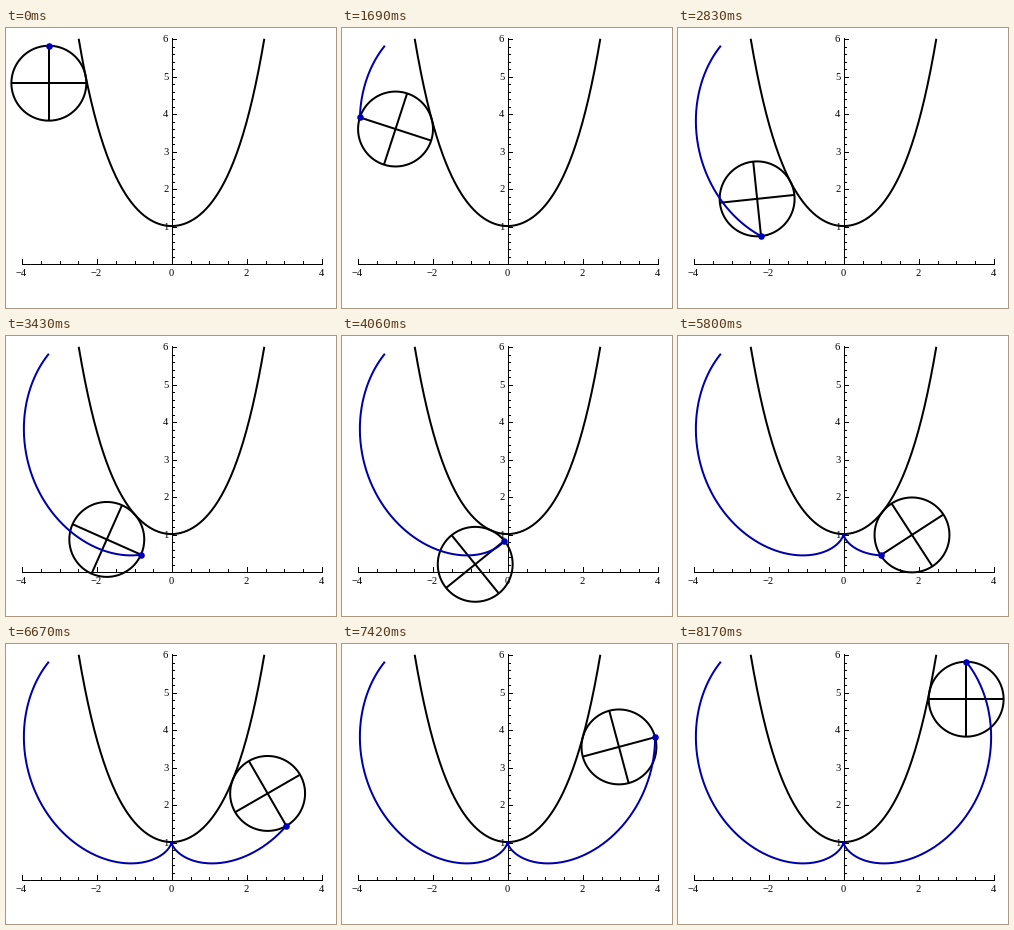
A matplotlib script for the animation above (9170 ms loop, 330 px wide and 280 px high).

```python
import numpy as np
import matplotlib.pyplot as plt
from matplotlib.animation import FuncAnimation
from matplotlib.collections import LineCollection

W, H = 330, 280
PX = 0.72                       # points per pixel at 100 dpi
X0, Y0, UNIT = 165.5, 235.5, 37.45
STEP_MS, HOLD_MS, LOOP_MS, TICK = 30, 1000, 9170, 14
STEPS, SUB = 240, 4             # poses, trace samples per pose
TRACE, DOT = (0, 0, 0.66), (0, 0, 0.73)


def to_px(x, y):
    return X0 + UNIT * np.asarray(x), Y0 - UNIT * np.asarray(y)


def turn(t):
    """Total rotation of the unit wheel touching y = cosh x at x = t."""
    return np.sinh(t) + 2 * np.arctan(np.tanh(t / 2))


# The wheel turns at a constant rate; invert turn() to find the contact.
phi = np.linspace(-2 * np.pi, 2 * np.pi, STEPS * SUB + 1)
grid = np.linspace(-2.4, 2.4, 20001)
contact = np.interp(phi, turn(grid), grid)
cx = contact + np.tanh(contact)
cy = np.cosh(contact) - 1 / np.cosh(contact)
angle = np.pi / 2 + phi
trace_x, trace_y = to_px(cx + np.cos(angle), cy + np.sin(angle))

fig = plt.figure(figsize=(W / 100, H / 100), dpi=100, facecolor="white")
ax = fig.add_axes([0, 0, 1, 1])
ax.set_xlim(0, W)
ax.set_ylim(H, 0)
ax.axis("off")


def line(x=(), y=(), color="black", width=2.0, z=3):
    return ax.plot(x, y, color=color, lw=width * PX, zorder=z,
                   solid_joinstyle="round", solid_capstyle="butt")[0]


def label(x, y, value, ha):
    ax.text(x, y, str(value).replace("-", "\u2212"), ha=ha,
            va="center_baseline", family="Liberation Serif",
            size=10.5 * PX, zorder=2)


def snap(v):
    return np.floor(v) + 0.5


def draw_axes():
    left, right = X0 - 4 * UNIT, X0 + 4 * UNIT
    segs = [[(snap(left), Y0), (snap(right) + 0.5, Y0)],
            [(X0, Y0), (X0, snap(Y0 - 6 * UNIT) - 0.5)]]
    for i in range(-8, 9):
        x = snap(X0 + i / 2 * UNIT)
        major = i % 4 == 0
        segs.append([(x, Y0), (x, Y0 - (4.5 if major else 2.5))])
        if major:
            label(x, 244, i // 2, "center")
    for i in range(1, 31):
        y = snap(Y0 - i / 5 * UNIT)
        major = i % 5 == 0
        segs.append([(X0, y), (X0 + (4.5 if major else 2.5), y)])
        if major:
            label(162.3, y, i // 5, "right")
    ax.add_collection(LineCollection(segs, colors="black", linewidths=PX,
                                     antialiaseds=False, zorder=1))


draw_axes()
edge = np.arccosh(6)
xs = np.linspace(-edge, edge, 300)
line(*to_px(xs, np.cosh(xs)))

wheel = line(z=4)
spokes = [line(z=4), line(z=4)]
trace = line(color=TRACE, z=5)
dot, = ax.plot([], [], "o", color=DOT, ms=6.6 * PX, mew=0, zorder=6)
ring = np.linspace(0, 2 * np.pi, 121)


def update(frame):
    now = frame * TICK + TICK - 2       # late in the tick, so no pose lags
    step = (now - HOLD_MS) // STEP_MS + 1
    k = min(max(step, 0), STEPS) * SUB
    wheel.set_data(*to_px(cx[k] + np.cos(ring), cy[k] + np.sin(ring)))
    for i, spoke in enumerate(spokes):
        a = angle[k] + i * np.pi / 2
        ends = np.array([-1, 1])
        spoke.set_data(*to_px(cx[k] + ends * np.cos(a),
                              cy[k] + ends * np.sin(a)))
    trace.set_data(trace_x[:k + 1], trace_y[:k + 1])
    dot.set_data([trace_x[k]], [trace_y[k]])
    return [wheel, *spokes, trace, dot]


anim = FuncAnimation(fig, update, frames=LOOP_MS // TICK, interval=TICK,
                     repeat=True, repeat_delay=0, blit=False)
plt.show()
```
